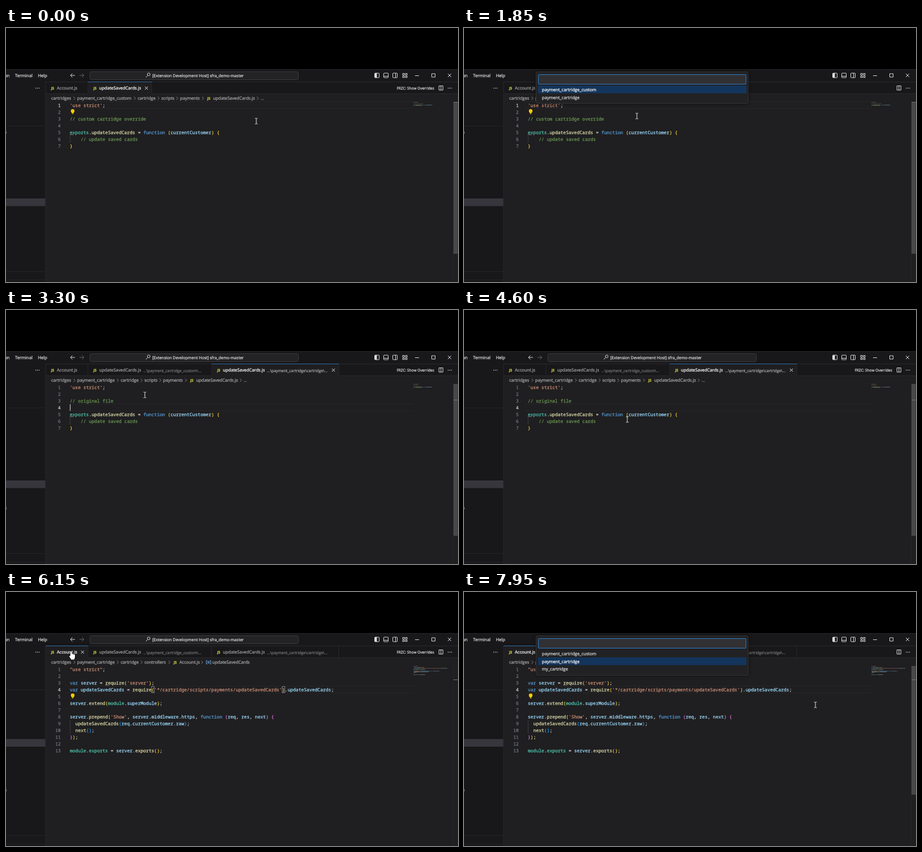
An HTML page with a canvas that plays this animation: 800 px wide and 450 px high, repeating every 8 s.

```html
<!DOCTYPE html>
<html lang="en">
<head>
<meta charset="utf-8">
<title>Editor override picker</title>
<style>
html, body { margin: 0; width: 100%; height: 100%; overflow: hidden; background: #000; }
canvas { display: block; }
</style>
</head>
<body>
<canvas id="stage" width="800" height="450"></canvas>
<script>
const ctx = document.getElementById('stage').getContext('2d');
const LOOP = 8000, CHAR = 4.818, LINE = 12, CODE_X = 113, CODE_Y = 137;
const UI = '"Open Sans", "Noto Sans", sans-serif';
const MONO = '"Noto Sans Mono", "DejaVu Sans Mono", monospace';
const EDITOR = '#1f1e20', CHROME = '#181719', BORDER = '#29282a';
const LIGHT = '#dadada', GREY = '#a0a0a0';

// In code lines, "~x" switches to colour x.
const COLORS = {
  w: '#d4d4d4', s: '#ce9178', c: '#6a9955', t: '#4ec9b0', f: '#dcdcaa',
  b: '#569cd6', v: '#9cdcfe', y: '#f0cc30', p: '#da70d6', i: '#179fff'
};
const savedCards = comment => [
  "~s'use strict'~w;", '', '~c// ' + comment, '',
  '~texports~w.~fupdateSavedCards ~w= ~bfunction ~y(~vcurrentCustomer~y) {',
  '~c    // update saved cards', '~y}'
];
const customCode = savedCards('custom cartridge override');
const baseCode = savedCards('original file');
const accountCode = [
  '~s"use strict"~w;', '',
  "~bvar ~vserver ~w= ~frequire~y(~s'server'~y)~w;",
  "~bvar ~vupdateSavedCards ~w= ~frequire~y(~s'*/cartridge/scripts/payments/updateSavedCards'~y)~w.~vupdateSavedCards~w;",
  '', '~vserver~w.~fextend~y(~tmodule~w.~vsuperModule~y)~w;', '',
  "~vserver~w.~fprepend~y(~s'Show'~w, ~vserver~w.~vmiddleware~w.~vhttps~w, ~bfunction ~p(~vreq~w, ~vres~w, ~vnext~p) {",
  '~f  updateSavedCards~i(~vreq~w.~vcurrentCustomer~w.~vraw~i)~w;',
  '~f  next~i()~w;', '~p}~y)~w;', '',
  '~tmodule~w.~texports ~w= ~vserver~w.~fexports~y()~w;'
];

const CURSOR = [
  [50, 443, 165], [650, 721, 118], [1000, 721, 118], [1850, 306, 156],
  [2400, 227, 129], [2950, 227, 129], [3250, 245, 150], [4200, 345, 209],
  [4300, 345, 209], [4600, 289, 194], [5150, 95, 112], [6050, 95, 112],
  [6950, 721, 118], [7250, 721, 118], [7800, 630, 201], [7900, 630, 201], [7950, 622, 200]
];
const SCROLLBAR = [
  [750, 1], [1100, 0], [1300, 0], [1400, 1], [2450, 1], [2800, 0.06], [3150, 0],
  [3250, 1], [5250, 1], [5300, 0], [7400, 0], [7500, 1]
];

function track(keys, time) {
  const next = keys.findIndex(k => k[0] > time);
  if (next === 0) return keys[0].slice(1);
  if (next < 0) return keys[keys.length - 1].slice(1);
  const a = keys[next - 1], b = keys[next];
  const u = (time - a[0]) / (b[0] - a[0]), e = u * u * (3 - 2 * u);
  return a.slice(1).map((v, i) => v + (b[i + 1] - v) * e);
}

function rect(x, y, w, h, color) {
  ctx.fillStyle = color;
  ctx.fillRect(x, y, w, h);
}
function box(x, y, w, h, radius, fill, stroke) {
  ctx.beginPath();
  ctx.roundRect(x, y, w, h, radius);
  if (fill) { ctx.fillStyle = fill; ctx.fill(); }
  if (stroke) { ctx.strokeStyle = stroke; ctx.lineWidth = 1; ctx.stroke(); }
}
// A hairline outline gives small glyphs the weight of screen-hinted text.
function text(str, x, y, color = LIGHT, size = 7.6, family = UI) {
  ctx.font = `${size}px ${family}`;
  ctx.fillStyle = ctx.strokeStyle = color;
  ctx.lineWidth = 0.25;
  ctx.lineJoin = 'round';
  ctx.fillText(str, x, y + 2.8);
  ctx.strokeText(str, x, y + 2.8);
}
function stroke(d, color = LIGHT, width = 1) {
  ctx.strokeStyle = color;
  ctx.lineWidth = width;
  ctx.stroke(new Path2D(d));
}
function dots(x, y, color = LIGHT) {
  for (const dx of [-3.5, -0.6, 2.3]) rect(x + dx, y - 0.6, 1.3, 1.3, color);
}
function jsIcon(x, y) {
  ctx.textAlign = 'center';
  text('JS', x, y - 0.4, '#cbcb41', '700 6.3', UI);
  ctx.textAlign = 'left';
}
function cross(x, y, r, color) {
  stroke(`M${x - r} ${y - r}l${2 * r} ${2 * r}m0 ${-2 * r}l${-2 * r} ${2 * r}`, color);
}

function drawTitleBar(pickerOpen) {
  rect(0, 73, 800, 22, CHROME);
  rect(0, 73, 800, 1, '#2a292b');
  text('Run', -7.5, 84);
  text('Terminal', 16, 84);
  text('Help', 56.5, 84);
  if (!pickerOpen) {
    stroke('M122 84h-8m3.5-3.5l-3.5 3.5 3.5 3.5');
    stroke('M130 84h8m-3.5-3.5l3.5 3.5-3.5 3.5', '#666');
    box(148.5, 77.5, 369, 14, 3, '#232224', '#3b3a3c');
    stroke('M247.5 87.5l3-3m-.3-2.3a2.4 2.4 0 1 1 4.8 0a2.4 2.4 0 1 1-4.8 0');
    text('[Extension Development Host] sfra_demo-master', 259, 84, LIGHT, 7.05);
  }
  for (const x of [652.5, 668.5, 684.5]) box(x, 80, 8, 8, 1, null, LIGHT);
  rect(653, 80, 3.5, 8, LIGHT);
  rect(669, 85, 7, 1, LIGHT);
  rect(689, 80, 1, 8, LIGHT);
  stroke('M702 80.5h3.2v3h-3.2zM702 85.3h3.2v2.4h-3.2zM707 80.5h3v3h-3zM707 85.3h3v2.4h-3z');
  rect(724, 84, 7, 1, LIGHT);
  stroke('M753.5 81h6v6h-6z');
  cross(785, 84, 3, LIGHT);
}

function drawSidebar(afterOpen, account) {
  rect(0, 95, 70, 355, CHROME);
  rect(69.5, 95, 1, 355, BORDER);
  dots(55.5, 106.5);
  for (const y of [173, 431, 446]) rect(0, y, 69, 1, '#242325');
  rect(0, account ? 260.5 : 302, 69.5, 13.5, '#37363d');
  text('s', -2.6, afterOpen ? 350 : 184.5);
}

function drawTabs(afterOpen, active) {
  rect(70, 95, 730, 22, CHROME);
  rect(70, 116, 730, 1, BORDER);
  rect(70, 95, 730, 1, BORDER);
  const tabs = afterOpen
    ? [[70, 145, 'Account.js', ''],
       [145, 364, 'updateSavedCards.js', '...\\payment_cartridge_custom\\...'],
       [364, 589, 'updateSavedCards.js', '...\\payment_cartridge\\cartridge\\...']]
    : [[70, 145, 'Account.js', ''], [145, 258, 'updateSavedCards.js', '']];
  tabs.forEach(([left, right, name, detail], i) => {
    const on = i === active;
    if (on) {
      rect(left, 95, right - left, 22, EDITOR);
      rect(left, 95, right - left, 1, '#2b6ca8');
    }
    rect(right - 0.5, 96, 1, 20, BORDER);
    jsIcon(left + 12.5, 106.5);
    text(name, left + 20, 106.5, on ? '#fff' : GREY);
    text(detail, left + 98, 106.8, on ? '#a8a8a8' : '#777', 6.85);
    if (on) cross(right - 9.5, 106.5, 2.6, '#eee');
  });
}

function drawActions(pickerOpen, hover) {
  if (!pickerOpen) {
    if (hover) box(689.5, 98, 70.5, 16, 3, '#323133');
    text('FRZC: Show Overrides', 691.5, 105.8, LIGHT, 6.5);
  }
  stroke('M766.3 102.5h7v7.5h-7zM769.8 102.5v7.5');
  dots(785.5, 106.5);
}

function drawBreadcrumbs(active) {
  const custom = active === 1 ? 30 : 0;
  const crumbs = [['cartridges', 80], [custom ? 'payment_cartridge_custom' : 'payment_cartridge', 126],
    ['cartridge', 203 + custom]];
  if (active === 0) crumbs.push(['controllers', 245], ['Account.js', 307], ['updateSavedCards', 365]);
  else crumbs.push(['scripts', 245 + custom], ['payments', 278 + custom],
    ['updateSavedCards.js', 336.5 + custom], ['...', 420.5 + custom]);
  crumbs.forEach(([name, x], i) => {
    text(name, x, 124.3, '#a9a9a9');
    const isFile = name.endsWith('.js'), isSymbol = active === 0 && i === 5;
    if (isFile) jsIcon(x - 7.5, 124.5);
    if (isSymbol) {
      stroke(`M${x - 8.5} 121.5h-2v6h2m4-6h2v6h-2`, '#75beff', 0.8);
      box(x - 8, 123, 3, 3, 1, null, '#75beff');
    }
    const chevron = x - (isFile || isSymbol ? 17.5 : 4.5);
    if (i) stroke(`M${chevron - 2} 121.7l2.8 2.8-2.8 2.8`, '#909090', 0.9);
  });
}

function drawCode(lines, current) {
  const currentY = CODE_Y + (current - 1) * LINE;
  rect(108, currentY - 7, 612, 1, '#262527');
  rect(108, currentY + 5, 612, 1, '#262527');
  lines.forEach((line, row) => {
    const y = CODE_Y + row * LINE;
    ctx.textAlign = 'right';
    text(row + 1, 96.8, y, row + 1 === current ? '#ccc' : '#6e7681', 8.03, MONO);
    ctx.textAlign = 'left';
    const parts = line.split(/~(.)/);
    if (/^~.  /.test(line)) rect(113, y - 6, 1, LINE, '#3a393b');
    let col = 0;
    for (let i = 1; i < parts.length; i += 2) {
      const color = COLORS[parts[i]];
      for (const word of parts[i + 1].matchAll(/\S+/g)) {
        const at = col + word.index, width = word[0].length;
        text(word[0], CODE_X + at * CHAR, y, color, 8.03, MONO);
        ctx.globalAlpha = 0.5;
        rect(721 + at * 0.62, 131 + row * 1.25, width * 0.62, 0.8, color);
        ctx.globalAlpha = 1;
      }
      col += parts[i + 1].length;
    }
  });
}

function hintDots(x, y) {
  for (let i = 0; i < 3; i++) rect(x + i * 2.5, y, 1.2, 1.2, '#aaa');
}
function drawBulb(row) {
  const y = CODE_Y + (row - 1) * LINE - 1;
  ctx.fillStyle = '#ffcc00';
  ctx.beginPath();
  ctx.arc(118, y - 1, 3.2, 0, 7);
  ctx.fill();
  rect(116.4, y + 1, 3.2, 2.2, '#ffcc00');
  rect(116.6, y + 3.6, 2.8, 1, '#d0a810');
}

function drawScrollbar(alpha, account, markY) {
  rect(791, 131, 1, 319, '#252426');
  ctx.globalAlpha = alpha;
  rect(792, 131, 7.5, account ? 228 : 269, '#48474a');
  ctx.globalAlpha = 1;
  rect(792, markY, 7.5, 1, '#77767a');
}

function drawPicker(items, selected, hovered) {
  const height = 28 + items.length * 14;
  ctx.shadowColor = 'rgba(0,0,0,.5)';
  ctx.shadowBlur = 6;
  box(127.5, 77.5, 375.5, height, 3, '#222123');
  ctx.shadowBlur = 0;
  box(127.5, 77.5, 375.5, height, 3, null, '#343335');
  box(131.5, 82.5, 367.5, 17, 1, '#313033', '#2a7fca');
  items.forEach((name, i) => {
    const y = 109 + i * 13.8;
    if (i === selected) rect(131, y - 7, 369, 13.8, '#14355b');
    else if (i === hovered) rect(131, y - 7, 369, 13.8, '#2a2a2c');
    text(name, 138, y, i === selected ? '#fff' : LIGHT);
  });
}

const HAND = new Path2D('M-2.6-6c0-1.6 2.6-1.6 2.6 0v3.6c.6-.6 1.8-.4 2 .4c.7-.5 1.8-.2 2 .6' +
  'c.9-.3 1.6.2 1.6 1.2v2.7c0 2-.8 2.9-1.2 5h-5.6c-.5-1.9-2-3.1-3-5c-.7-1.3.7-2.2 1.6-1.2z');
function drawCursor(x, y) {
  ctx.save();
  ctx.translate(x, y);
  if (y > 133) {
    stroke('M-2.3-5h1.5l.8.8.8-.8h1.5M0-4.2v8.4M-2.3 5h1.5l.8-.8.8.8h1.5', '#e8e8e8', 1);
  } else {
    ctx.lineJoin = 'round';
    ctx.lineWidth = 1.4;
    ctx.strokeStyle = '#000';
    ctx.stroke(HAND);
    ctx.fillStyle = '#fff';
    ctx.fill(HAND);
  }
  ctx.restore();
}

function draw(time) {
  const afterOpen = time >= 2950, account = time >= 5300;
  const firstPicker = time >= 1000 && time < 2950, secondPicker = time >= 7300;
  const pickerOpen = firstPicker || secondPicker;
  const active = account ? 0 : afterOpen ? 2 : 1;
  const [x, y] = track(CURSOR, time);

  rect(0, 0, 800, 450, '#000');
  rect(0, 73, 800, 377, EDITOR);
  drawTitleBar(pickerOpen);
  drawTabs(afterOpen, active);
  drawSidebar(afterOpen, account);
  drawActions(pickerOpen, x > 689 && x < 760 && y < 122);
  drawBreadcrumbs(active);

  drawCode([accountCode, customCode, baseCode][active], afterOpen ? 4 : 1);
  if (account) {
    hintDots(176, 164.5);
    if (!secondPicker) for (const col of [30, 78])
      box(CODE_X + col * CHAR, 167.5, CHAR, 11, 0, null, '#888');
    drawBulb(time < 6000 ? 2 : 5);
  } else {
    hintDots(113, 188.5);
    if (!afterOpen) drawBulb(2);
  }
  const blinkStart = account ? 5300 : 3000;
  if (afterOpen && !secondPicker && Math.floor((time - blinkStart) / 500) % 2 === 0)
    rect(account ? 387.3 : 113, 167, 1.2, 11.5, '#c8c8c8');
  drawScrollbar(track(SCROLLBAR, time)[0], account, account ? 155 : afterOpen ? 159 : 131);

  const items = ['payment_cartridge_custom', 'payment_cartridge'];
  const hovered = y < 133 && x > 131 && x < 500 ? 1 : -1;
  if (firstPicker) drawPicker(items, 0, hovered);
  if (secondPicker) drawPicker([...items, 'my_cartridge'], 1, -1);
  drawCursor(x, y);
}

ctx.textRendering = 'geometricPrecision';
const start = performance.now();
function tick() {
  const time = (performance.now() - start) % LOOP;
  draw(Math.floor(time / 50) * 50);
  requestAnimationFrame(tick);
}
tick();
</script>
</body>
</html>
```
